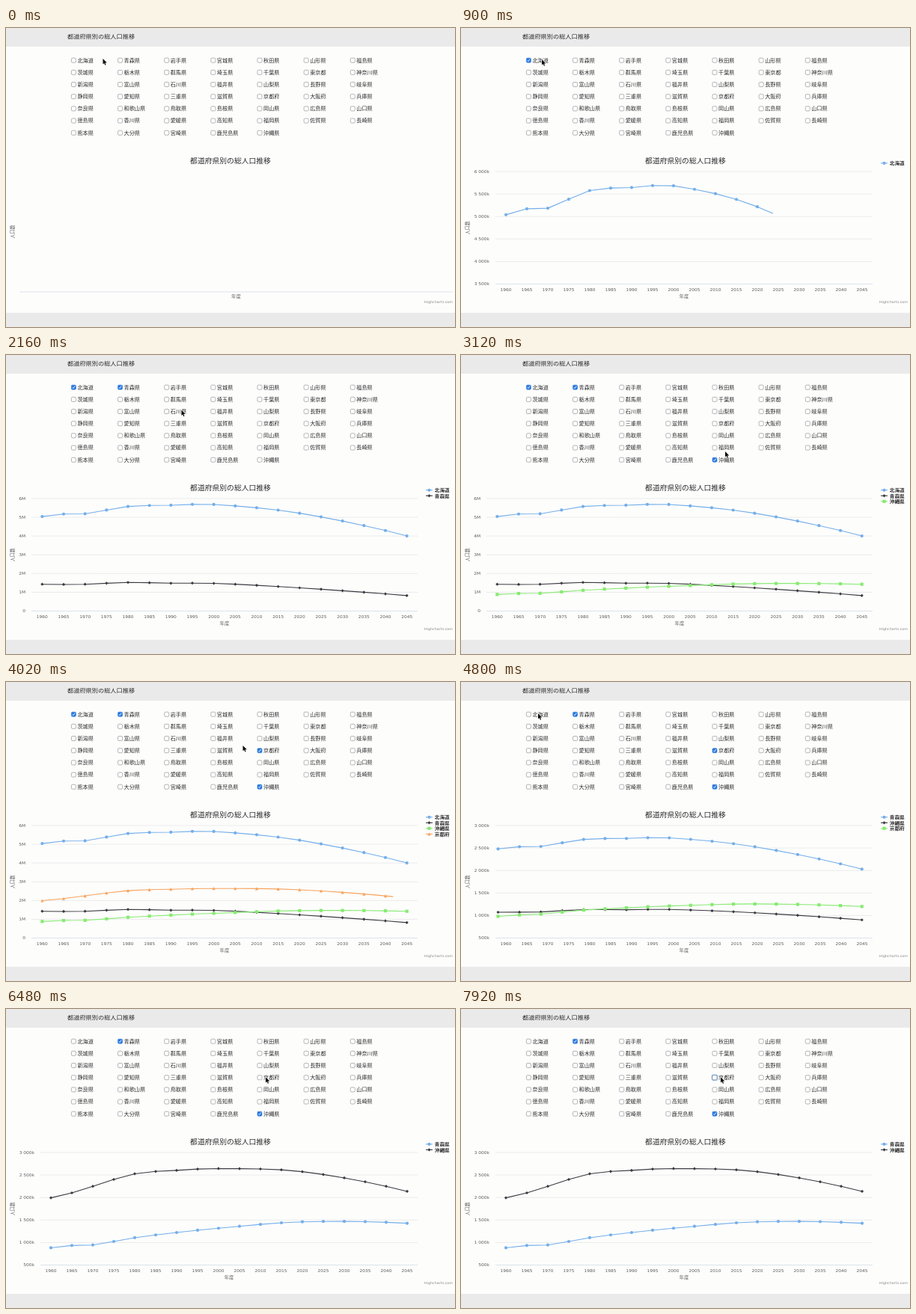
Write an HTML page with a canvas that moves like this. It is 600 by 400 pixels and loops after 7.98 s.

```html
<!DOCTYPE html>
<html lang="ja">
<head>
<meta charset="utf-8">
<title>都道府県別の総人口推移</title>
<style>
html, body { margin: 0; width: 100%; height: 100%; overflow: hidden; background: #fdfdfc; }
canvas { display: block; width: 600px; height: 400px; }
</style>
</head>
<body>
<canvas id="stage"></canvas>
<script>
const LOOP = 7980, MORPH = 300, REVEAL = 550;
const CJK = '"Noto Sans CJK JP", "Noto Sans CJK", sans-serif';
const LATIN = '"DejaVu Sans", sans-serif';
const INK = '#28282a', SOFT = '#5c5c5e', PAPER = '#fdfdfc', BAND = '#eaeaea';
const COLORS = ['#74aeea', '#3a3a40', '#88ea72', '#f7a35c'];
const TOP = 192, RIGHT = 550, BOTTOM = 342.5, COUNT = 18;
const SQUASH = 0.9; // the page is shown slightly flattened
const TITLE = '都道府県別の総人口推移';

const ROWS = [
  '北海道 青森県 岩手県 宮城県 秋田県 山形県 福島県',
  '茨城県 栃木県 群馬県 埼玉県 千葉県 東京都 神奈川県',
  '新潟県 富山県 石川県 福井県 山梨県 長野県 岐阜県',
  '静岡県 愛知県 三重県 滋賀県 京都府 大阪府 兵庫県',
  '奈良県 和歌山県 鳥取県 島根県 岡山県 広島県 山口県',
  '徳島県 香川県 愛媛県 高知県 福岡県 佐賀県 長崎県',
  '熊本県 大分県 宮崎県 鹿児島県 沖縄県'
].map(row => row.split(' '));

// Population in thousands at a few five-year steps, joined by a smooth curve
const KNOTS = [0, 1, 2, 4, 6, 8, 12, 17];
const DATA = {
  北海道: curve(5039, 5172, 5184, 5576, 5644, 5683, 5217, 4005),
  青森県: curve(1427, 1417, 1428, 1524, 1483, 1476, 1236, 824),
  沖縄県: curve(883, 934, 945, 1107, 1222, 1318, 1460, 1428),
  京都府: curve(1993, 2103, 2250, 2527, 2603, 2644, 2574, 2137)
};

function curve(...v) {
  const last = v.length - 1;
  const secant = (a, b) => (v[b] - v[a]) / (KNOTS[b] - KNOTS[a]);
  const slopes = v.map((_, i) => secant(Math.max(0, i - 1), Math.min(last, i + 1)));
  slopes[last] = 2 * secant(last - 1, last) - slopes[last - 1];
  return Array.from({ length: COUNT }, (_, x) => {
    const i = Math.max(1, KNOTS.findIndex(k => k >= x)), w = KNOTS[i] - KNOTS[i - 1];
    const u = (x - KNOTS[i - 1]) / w, q = 1 - u;
    return v[i - 1] * q * q * (1 + 2 * u) + v[i] * u * u * (3 - 2 * u)
      + w * u * q * (slopes[i - 1] * q - slopes[i] * u);
  });
}

const kilo = v => String(v).replace(/(\d)(\d{3})$/, '$1 $2') + 'k';
const mega = v => v ? v / 1000 + 'M' : '0';
const axis = (left, min, max, step, label) => ({ left, min, max, step, label });
const HIGH = axis(46, 3500, 6000, 500, kilo);
const FULL = axis(34, 0, 6000, 1000, mega);
const LOW = axis(46, 500, 3000, 500, kilo);

const state = (at, axis, names, lines = names) =>
  ({ at, axis, names: names.split(' '), lines: lines.split(' ') });
const STATES = [
  { at: 0, axis: null, names: [], lines: [] },
  state(540, HIGH, '北海道'),
  state(1600, FULL, '北海道 青森県'),
  state(2480, FULL, '北海道 青森県 沖縄県'),
  state(3560, FULL, '北海道 青森県 沖縄県 京都府'),
  state(4739, LOW, '青森県 沖縄県 京都府'),
  state(5700, LOW, '青森県 沖縄県', '沖縄県 京都府')
];

// Pointer moves: start, end, x, y
const MOVES = [
  [60, 180, 108, 42], [1260, 1500, 167, 42], [1980, 2420, 353, 129],
  [3130, 3480, 347, 91], [3860, 4560, 103, 42], [4920, 5460, 347, 91]
];

const canvas = document.getElementById('stage');
const ctx = canvas.getContext('2d');
const ratio = window.devicePixelRatio || 1;
canvas.width = 600 * ratio;
canvas.height = 400 * ratio;

const clamp = v => Math.max(0, Math.min(1, v));
const ease = v => (1 - Math.cos(Math.PI * clamp(v))) / 2;
const mix = (a, b, p) => a + (b - a) * p;

function text(str, x, y, size, opts = {}) {
  const { font = CJK, color = INK, align = 'left', weight = 400, angle = 0 } = opts;
  ctx.save();
  ctx.translate(x, y);
  ctx.scale(1, SQUASH);
  ctx.rotate(angle);
  ctx.font = `${weight} ${size}px ${font}`;
  ctx.fillStyle = color;
  ctx.textAlign = align;
  ctx.fillText(str, 0, size * (font === CJK ? 0.38 : 0.365));
  ctx.restore();
}

function line(points, color, width = 1) {
  ctx.beginPath();
  points.forEach(([x, y]) => ctx.lineTo(x, y));
  ctx.strokeStyle = color;
  ctx.lineWidth = width;
  ctx.stroke();
}

function polygon(points, color) {
  ctx.beginPath();
  points.forEach(([x, y]) => ctx.lineTo(x, y));
  ctx.closePath();
  ctx.fillStyle = color;
  ctx.fill();
}

function marker(i, x, y) {
  const r = 2.1, c = COLORS[i];
  if (i === 0) {
    ctx.beginPath();
    ctx.arc(x, y, r, 0, Math.PI * 2);
    ctx.fillStyle = c;
    ctx.fill();
  } else if (i === 1) {
    polygon([[x, y - r], [x + r, y], [x, y + r], [x - r, y]], c);
  } else if (i === 2) {
    ctx.fillStyle = c;
    ctx.fillRect(x - r, y - r, 2 * r, 2 * r);
  } else {
    polygon([[x, y - r], [x + r, y + r], [x - r, y + r]], c);
  }
}

function box(x, y, w, r, color) {
  ctx.beginPath();
  ctx.roundRect(x - w / 2, y - w / 2, w, w, r);
  ctx.fillStyle = color;
  ctx.fill();
}

function checkbox(x, y, on, focus) {
  if (focus) box(x, y, 8.6, 2.4, '#8fb9e8');
  box(x, y, 6, 1.4, on ? '#2878dc' : '#fff');
  ctx.strokeStyle = on ? '#2878dc' : '#848488';
  ctx.lineWidth = 0.6;
  ctx.stroke();
  if (on) line([[x - 1.7, y + 0.1], [x - 0.5, y + 1.5], [x + 1.7, y - 1.7]], '#fff', 0.9);
}

function form(names, t) {
  ROWS.forEach((row, r) => row.forEach((name, c) => {
    const x = 90.4 + c * 62.15, y = 43.2 + r * 16.17;
    checkbox(x, y, names.includes(name), name === '京都府' && t >= 7680);
    text(name, x + 5, y, 7.15);
  }));
}

const spot = (ax, name, i) => [
  ax.left + (i + 0.5) * (RIGHT - ax.left) / COUNT,
  mix(BOTTOM, TOP, (DATA[name][i] - ax.min) / (ax.max - ax.min))
];

function axes(ax) {
  const left = ax ? ax.left : 18, right = ax ? RIGHT : 597, bottom = ax ? BOTTOM : 353;
  if (ax) {
    const small = { font: LATIN, color: SOFT };
    for (let v = ax.min; v <= ax.max; v += ax.step) {
      const y = mix(BOTTOM, TOP, (v - ax.min) / (ax.max - ax.min));
      if (v > ax.min) line([[left, y], [right, y]], '#e4e4e6', 0.7);
      text(ax.label(v), left - 8, y, 5.9, { ...small, align: 'right' });
    }
    for (let i = 0; i < COUNT; i++) {
      const x = left + (i + 0.5) * (right - left) / COUNT;
      text(1960 + i * 5, x, 350, 5.9, { ...small, align: 'center' });
    }
  }
  line([[left, bottom], [right, bottom]], '#d6dee6', 0.8);
  const label = { color: SOFT, align: 'center' };
  text('年度', (left + right) / 2, 359, 6.4, label);
  text('人口数', 8.7, (TOP + bottom) / 2, 6.6, { ...label, angle: -Math.PI / 2 });
}

function plot(now, before, t) {
  const p = ease((t - now.at) / MORPH);
  now.lines.forEach((name, i) => {
    const old = before.lines[i];
    const pts = DATA[name].map((_, k) => {
      const end = spot(now.axis, name, k);
      if (!old) return end;
      const start = spot(before.axis, old, k);
      return [mix(start[0], end[0], p), mix(start[1], end[1], p)];
    });
    ctx.save();
    if (!old) {
      ctx.beginPath();
      ctx.rect(now.axis.left, 180, (RIGHT - now.axis.left) * ease((t - now.at) / REVEAL), 170);
      ctx.clip();
    }
    line(pts, COLORS[i], 1.1);
    pts.forEach(([x, y]) => marker(i, x, y));
    ctx.restore();
  });
}

function legend(names) {
  names.forEach((name, i) => {
    const y = 180.8 + i * 7.5;
    line([[561, y], [570, y]], COLORS[i], 1.1);
    marker(i, 565.5, y);
    text(name, 572.8, y, 6.6, { weight: 700 });
  });
}

function pointer(t) {
  let x = 129.5, y = 41;
  for (const [start, end, toX, toY] of MOVES) {
    const p = ease((t - start) / (end - start));
    x = mix(x, toX, p);
    y = mix(y, toY, p);
  }
  const shape = [[0, 0], [0, 7.4], [1.7, 5.9], [2.9, 8.7], [4.1, 8.2], [2.9, 5.5], [5.3, 5.4]]
    .map(([dx, dy]) => [x + dx, y + dy]);
  ctx.lineJoin = 'round';
  line([...shape, shape[0]], '#fff', 1.2);
  polygon(shape, '#0a0a0a');
}

function draw(t) {
  let n = STATES.length - 1;
  while (STATES[n].at > t) n--;
  const now = STATES[n], before = STATES[Math.max(0, n - 1)];
  ctx.setTransform(ratio, 0, 0, ratio, 0, 0);
  ctx.fillStyle = PAPER;
  ctx.fillRect(0, 0, 600, 400);
  ctx.fillStyle = BAND;
  ctx.fillRect(0, 0, 600, 25);
  ctx.fillRect(0, 381, 600, 19);
  text(TITLE, 82, 11.3, 8.2);
  form(now.names, t);
  text(TITLE, 300, 177.3, 9.8, { align: 'center' });
  axes(now.axis);
  if (now.axis) plot(now, before, t);
  legend(now.names);
  text('Highcharts.com', 597, 366.5, 4.83, { font: LATIN, color: '#858588', align: 'right' });
  pointer(t);
}

const begin = performance.now();
function tick() {
  draw(Math.max(0, performance.now() - begin) % LOOP);
  requestAnimationFrame(tick);
}
tick();
</script>
</body>
</html>
```
